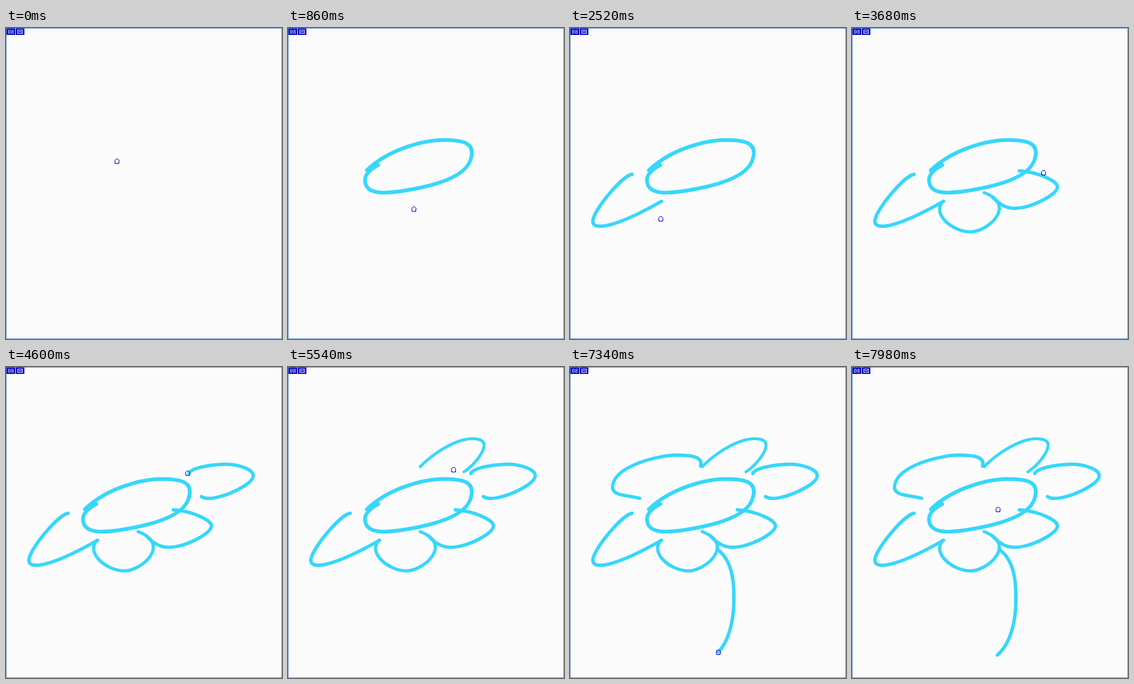
An HTML page that plays this animation: 480 px wide and 540 px high, repeating every 8000 ms.

```html
<!DOCTYPE html>
<html lang="en">
<head>
<meta charset="utf-8">
<title>Flower sketch</title>
<style>
  html, body { margin: 0; width: 100%; height: 100%; overflow: hidden; background: #fbfbfb; }
  svg { display: block; width: 480px; height: 540px; }
  text { font: 9px "DejaVu Sans Mono", monospace; }
  #ink { fill: none; stroke: #36d7fb; stroke-linecap: round; stroke-linejoin: round; filter: blur(.5px); }
</style>
</head>
<body>
<svg viewBox="0 0 480 540">
  <rect width="480" height="540" fill="#fbfbfb"/>
  <g id="ink"></g>
  <rect x=".5" y=".5" width="479" height="539" fill="none" stroke="#5b8cc8"/>
  <g shape-rendering="crispEdges">
    <path d="M1 1h15v11h-15zM17 1h15v11h-15z" fill="#0000c0"/>
    <path d="M20.5 3.5h8v6h-8zM22 5.5h1M26 5.5h1M23 6.5h3M22 7.5h1M26 7.5h1" fill="none" stroke="#fff"/>
  </g>
  <text x="3" y="10" fill="#fff">08</text>
  <rect id="cursor" x="-3.5" y="-3.5" width="7" height="8" rx="3" fill="none" stroke="#0000c4"
    shape-rendering="crispEdges"/>
</svg>
<script>
const LOOP = 8000;
const NS = "http://www.w3.org/2000/svg";
const ink = document.getElementById("ink");
const cursor = document.getElementById("cursor");

const stroke = (start, end, width, d) => {
  const path = document.createElementNS(NS, "path");
  path.setAttribute("d", d);
  const length = path.getTotalLength();
  path.setAttribute("pathLength", 1);
  path.setAttribute("stroke-width", width);
  ink.append(path);
  return { start, end, path, at: u => path.getPointAtLength(u * length) };
};
const rest = (start, end, x, y) => ({ start, end, at: () => ({ x, y }) });

const events = [
  rest(0, 20, 193, 231),
  // flower centre
  stroke(140, 660, 6.4, "M157 238C140 247 133 257 134 266C136 290 168 288 205 282S305 263 317 230S300 194.5 270 194.5S178 208 137 247"),
  rest(840, 860, 219, 314),
  // petals
  stroke(1500, 2200, 6, "M108 254C92 256 44 312 40 333S78 347 159 301"),
  rest(2440, 2520, 158, 331),
  stroke(2600, 3000, 5.6, "M158 301C138 324 176 354 206 354S288 308 230 286"),
  stroke(3080, 3560, 5.8, "M244 293C262 313 278 316 300 311S353 290 357 278S322 250 291 248"),
  rest(3680, 3680, 333, 251),
  stroke(3910, 4480, 5.8, "M340 225C350 232 373 226 390 219S431 199 430 188S402 168 378 169S322 175 318 185"),
  stroke(4930, 5400, 5, "M306 182C322 172 342 148 341 135S316 123 300 128S254 148 230 173"),
  rest(5540, 5540, 288, 178),
  stroke(5640, 6300, 5.8, "M227 172C232 156 212 153 185 153S78 170 74 207C72 224 98 222 121 228"),
  rest(6600, 6710, 284, 365),
  // stem
  stroke(6880, 7400, 6, "M258 318C283 338 285 375 285 398C286 440 276 480 253 500"),
  rest(7980, LOOP, 254, 247)
];

const clamp = u => Math.max(0, Math.min(1, u));
const ease = u => u * u * (3 - 2 * u);
const progress = (t, a, b) => b > a ? ease(clamp((t - a) / (b - a))) : +(t >= a);

// The lifted pen travels between two points in a shallow arc.
function travel(a, b, u) {
  const bow = u * (1 - u) * 0.5;
  return {
    x: a.x + (b.x - a.x) * u - (b.y - a.y) * bow,
    y: a.y + (b.y - a.y) * u + (b.x - a.x) * bow
  };
}

function penAt(t) {
  const i = events.findLastIndex(e => e.start <= t);
  const now = events[i], next = events[i + 1];
  if (t < now.end || !next) return now.at(progress(t, now.start, now.end));
  return travel(now.at(1), next.at(0), progress(t, now.end, next.start));
}

function render(t) {
  for (const { path, start, end } of events) {
    if (!path) continue;
    path.style.display = t > start ? "" : "none";
    path.setAttribute("stroke-dasharray", `${progress(t, start, end)} 2`);
  }
  const pen = penAt(t);
  cursor.setAttribute("transform", `translate(${Math.round(pen.x)} ${Math.round(pen.y)})`);
}

const begin = performance.now();
function tick() {
  render((performance.now() - begin) % LOOP);
  requestAnimationFrame(tick);
}
tick();
</script>
</body>
</html>
```
